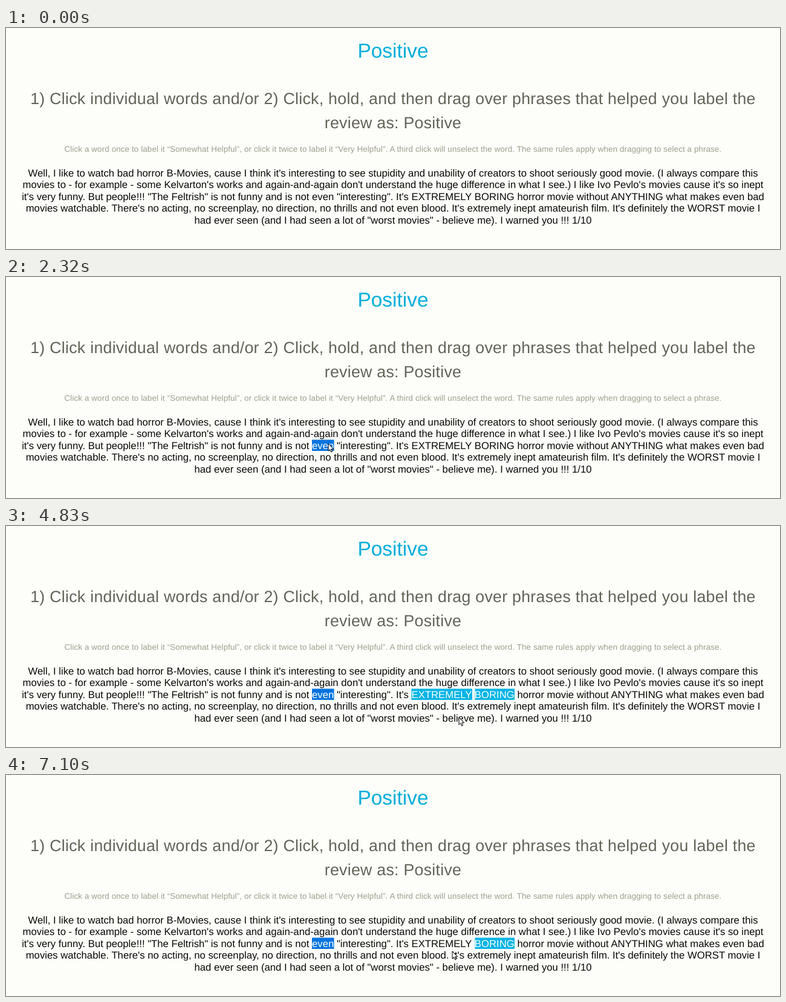
An HTML page that plays this animation: 1280x366 px, repeating every 7.2 s.

```html
<!DOCTYPE html>
<html lang="en">
<head>
<meta charset="utf-8">
<title>Word labelling</title>
<style>
  html, body { margin: 0; width: 100%; height: 100%; overflow: hidden; background: #fdfdfa; }
  svg { display: block; width: 1280px; height: 366px; }
  text {
    font-family: "Liberation Sans", Arial, sans-serif;
    text-anchor: middle;
    text-rendering: geometricPrecision;
  }
  .title { font-size: 33.4px; fill: #00aedb; }
  .task { font-size: 26.74px; letter-spacing: .01em; fill: #636359; }
  .hint { font-size: 13.37px; letter-spacing: .0095em; fill: #9e9e8e; }
  .review { font-size: 16.72px; fill: #080806; }
</style>
</head>
<body>
<svg viewBox="0 0 1280 366">
  <g id="marks"></g>
  <text class="title" x="640" y="49">Positive</text>
  <text class="task" x="640" y="126.4">1) Click individual words and/or 2) Click, hold, and then drag over phrases that helped you label the</text>
  <text class="task" x="640" y="166.4">review as: Positive</text>
  <text class="hint" x="640" y="205.2">Click a word once to label it “Somewhat Helpful”, or click it twice to label it “Very Helpful”. A third click will unselect the word. The same rules apply when dragging to select a phrase.</text>
  <g class="review">
    <text x="640" y="246">Well, I like to watch bad horror B-Movies, cause I think it's interesting to see stupidity and unability of creators to shoot seriously good movie. (I always compare this</text>
    <text x="640" y="265.4">movies to - for example - some Kelvarton's works and again-and-again don't understand the huge difference in what I see.) I like Ivo Pevlo's movies cause it's so inept</text>
    <text x="640" y="284.8">it's very funny. But people!!! "The Feltrish" is not funny and is not <tspan id="even">even</tspan> "interesting". It's <tspan id="extremely">EXTREMELY</tspan> <tspan id="boring">BORING</tspan> horror movie without ANYTHING what makes even bad</text>
    <text x="640" y="304.2">movies watchable. There's no acting, no screenplay, no direction, no thrills and not even blood. It's extremely inept amateurish film. It's definitely the WORST movie I</text>
    <text x="640" y="323.6">had ever seen (and I had seen a lot of "worst movies" - believe me). I warned you !!! 1/10</text>
  </g>
  <path id="cursor" d="M0 0V12.2L2.8 9.6 4.7 14 6.6 13.2 4.8 8.9H8.7Z" fill="#fff" stroke="#000" stroke-width="1"/>
</svg>
<script>
const LOOP = 7200;
const COLORS = ['none', '#00b3e6', '#0073df'];  // unselected, somewhat, very helpful

// Each click time raises the label by one; the third click clears it.
const words = [
  { id: 'even', x: 506, w: 36.5, clicks: [1080, 1700] },
  { id: 'extremely', x: 670.5, w: 100.5, clicks: [3180, 6300, 6560] },
  { id: 'boring', x: 775.5, w: 65.5, clicks: [3740] }
];

// Pointer stops: time, x, y
const path = [
  [350, 556, 368], [1000, 528, 275], [1250, 528, 275], [1600, 533, 276],
  [2400, 533, 276], [3050, 676, 277], [3180, 678, 277], [3600, 764, 275],
  [3900, 832, 277], [4050, 832, 277], [4700, 749, 317], [5500, 749, 317],
  [5820, 745, 311], [6180, 728, 277], [6620, 728, 277], [6960, 738, 292],
  [LOOP, 738, 292]
];

const $ = id => document.getElementById(id);
const cursor = $('cursor');

for (const word of words) {
  word.text = $(word.id);
  word.mark = document.createElementNS('http://www.w3.org/2000/svg', 'rect');
  const box = { x: word.x, y: 269.5, width: word.w, height: 18.5 };
  for (const key in box) word.mark.setAttribute(key, box[key]);
  $('marks').append(word.mark);
}

function pointerAt(t) {
  const i = path.findIndex(stop => stop[0] > t);
  if (i < 1) return [0, 400];
  const [t0, x0, y0] = path[i - 1], [t1, x1, y1] = path[i];
  const u = (t - t0) / (t1 - t0), e = u * u * (3 - 2 * u);
  return [x0 + (x1 - x0) * e, y0 + (y1 - y0) * e];
}

function draw(now) {
  const t = now % LOOP;
  for (const { clicks, mark, text } of words) {
    const level = clicks.filter(c => c <= t).length % 3;
    mark.style.fill = COLORS[level];
    text.style.fill = level ? '#fff' : '';
  }
  cursor.setAttribute('transform', `translate(${pointerAt(t)})`);
}

let start;
function tick(now) {
  start ??= now;
  draw(now - start);
  requestAnimationFrame(tick);
}
draw(0);
requestAnimationFrame(tick);
</script>
</body>
</html>
```
